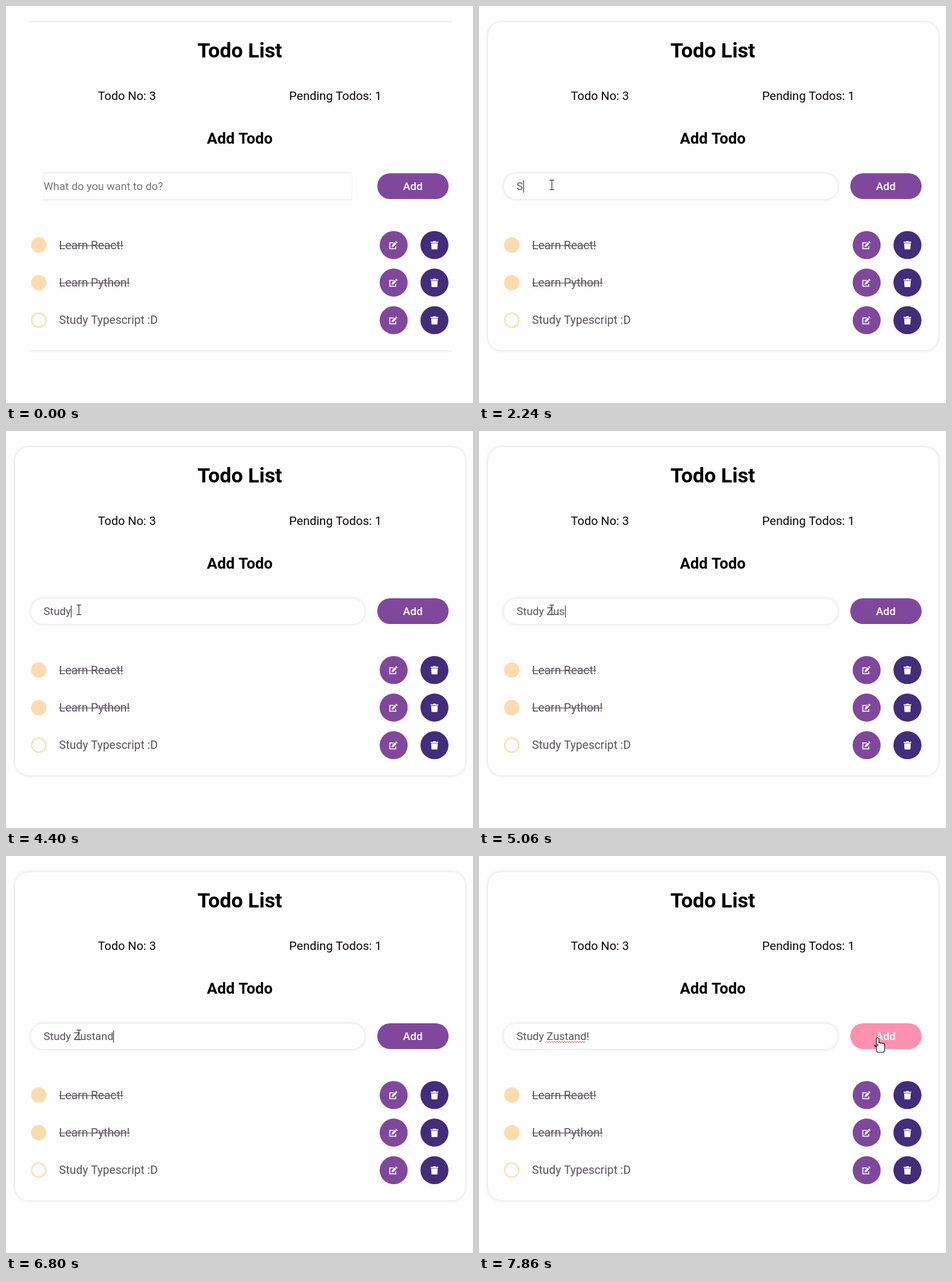
Write an HTML page with a canvas that moves like this. It is 727 px wide and 617 px high and loops after 8000 ms.

```html
<!DOCTYPE html>
<html lang="en">
<head>
<meta charset="utf-8">
<title>Todo List</title>
<style>
html, body { margin: 0; width: 727px; height: 617px; overflow: hidden; background: #fefefe; }
canvas { display: block; }
</style>
</head>
<body>
<canvas id="stage" width="727" height="617"></canvas>
<script>
const ctx = document.getElementById('stage').getContext('2d');
const LOOP = 8000, KEY_GAP = 100, BLINK = 560;
const ENTER = 130, CLICK = 990, LEAVE = 7000;
const PAPER = '#fefefe', PURPLE = '#80489c', INDIGO = '#432c7a', PINK = '#fd91af', PEACH = '#fcdcae';
const FIELD = { x: 38.5, y: 260.5, w: 520, h: 39.5 };
const BUTTON = { x: 578, y: 260, w: 111, h: 40 };
const TEXT_X = 58.5;

const todos = [['Learn React!', true], ['Learn Python!', true], ['Study Typescript :D', false]];

// Letters within a burst follow each other at an even pace.
const bursts = [[2120, 'S'], [2930, 'tud'], [3870, 'y'], [4460, ' '], [4790, 'Zustand'], [6860, '!']];
const keys = bursts.flatMap(([start, letters]) =>
  [...letters].map((letter, i) => ({ time: start + i * KEY_GAP, letter })));

const easeOut = k => 1 - (1 - k) ** 2;
const easeInOut = k => k * k * (3 - 2 * k);
const glides = [
  { start: ENTER, end: 500, from: [8, 590], to: [113, 278], ease: easeOut },
  { start: LEAVE, end: 7320, from: [113, 278], to: [717, 293], ease: easeInOut },
  { start: 7320, end: 7590, from: [717, 293], to: [620, 283], ease: easeInOut }
];

function pointerAt(t) {
  const glide = glides.filter(g => t >= g.start).pop();
  if (!glide) return null;
  const k = glide.ease(Math.min(1, (t - glide.start) / (glide.end - glide.start)));
  return glide.from.map((v, i) => v + (glide.to[i] - v) * k);
}

function inside(p, box) {
  return p && p[0] >= box.x && p[0] <= box.x + box.w && p[1] >= box.y && p[1] <= box.y + box.h;
}

function text(str, x, y, size, color, weight = 400, align = 'left') {
  ctx.font = `${weight} ${size}px Roboto, sans-serif`;
  ctx.fillStyle = color;
  ctx.textAlign = align;
  ctx.fillText(str, x, y);
}

function disc(x, y, r, color) {
  ctx.fillStyle = color;
  ctx.beginPath();
  ctx.arc(x, y, r, 0, Math.PI * 2);
  ctx.fill();
}

function pill({ x, y, w, h }, r, color) {
  ctx.fillStyle = color;
  ctx.beginPath();
  ctx.roundRect(x, y, w, h, r);
  ctx.fill();
}

// Before the pointer enters, only the level edges of a panel show.
function panel(box, r, t) {
  ctx.save();
  if (t < ENTER) {
    ctx.beginPath();
    ctx.rect(box.x + r, 0, box.w - 2 * r, 617);
    ctx.clip();
  }
  ctx.shadowColor = 'rgba(0,0,0,0.17)';
  ctx.shadowBlur = 5;
  pill(box, r, PAPER);
  ctx.restore();
}

function at(x, y, draw) {
  ctx.save();
  ctx.translate(x, y);
  draw();
  ctx.restore();
}

function editIcon() {
  ctx.strokeStyle = ctx.fillStyle = '#fff';
  ctx.lineWidth = 1.5;
  ctx.stroke(new Path2D('M0.5-4H-5.5V5.2H3.7V1.5'));
  ctx.rotate(Math.PI / 4);
  ctx.fillRect(-1.6, -5, 3.2, 6.5);
  ctx.fillRect(-1.6, -7.8, 3.2, 2);
  ctx.fill(new Path2D('M-1.6 1.5H1.6L0 4Z'));
}

function trashIcon() {
  ctx.fillStyle = '#fff';
  ctx.fillRect(-6, -5.5, 12, 1.7);
  ctx.fillRect(-2, -6.5, 4, 1.4);
  ctx.fill(new Path2D('M-5.2-3H5.2L4.5 6.5H-4.5Z'));
}

function ibeam() {
  ctx.strokeStyle = '#222';
  ctx.lineWidth = 1;
  ctx.stroke(new Path2D('M-3-7.5H4M0.5-7.5V7.5M-3 7.5H4'));
}

function arrow() {
  ctx.fillStyle = '#100510';
  ctx.fill(new Path2D('M0 0V14L3 11L5.5 17L8 16L5.5 10.5H9.5Z'));
}

function hand() {
  const outline = new Path2D('M-1 14L-4.5 11');
  for (let i = 0; i < 4; i++) outline.roundRect(-1 + i * 3, i ? 7 + i * 0.5 : 0, 3, 10, 1.5);
  outline.roundRect(-1, 11, 12, 10.5, 3);
  ctx.strokeStyle = '#181018';
  ctx.lineWidth = 2;
  ctx.stroke(outline);
  ctx.fillStyle = '#fff';
  ctx.fill(outline);
}

function todoRow([label, done], row) {
  const y = 371.5 + row * 58.4;
  const base = 378 + row * 58;
  disc(51, y, 12, PEACH);
  if (!done) disc(51, y, 10, PAPER);
  text(label, 82.5, base, 18, '#58505e');
  if (done) ctx.fillRect(82.5, base - 6, ctx.measureText(label).width, 1);
  disc(603.5, y, 21.8, PURPLE);
  disc(667, y, 21.8, INDIGO);
  at(603, y + 0.5, editIcon);
  at(667, y + 0.3, trashIcon);
}

function spellingMark() {
  const start = TEXT_X + ctx.measureText('Study ').width;
  const end = start + ctx.measureText('Zustand').width;
  ctx.strokeStyle = '#c8402f';
  ctx.lineWidth = 1;
  ctx.beginPath();
  for (let x = start, i = 0; x <= end; x += 2, i++) ctx.lineTo(x, 288 + (i % 2) * 2);
  ctx.stroke();
}

function inputField(t) {
  panel(FIELD, 20, t);
  const pressed = keys.filter(key => key.time <= t);
  const value = pressed.map(key => key.letter).join('');
  text(value || 'What do you want to do?', TEXT_X, 286, 17, value ? '#58505e' : '#757575');

  const lastAction = pressed.length ? pressed[pressed.length - 1].time : CLICK;
  if (t >= CLICK && Math.floor((t - lastAction) / BLINK) % 2 === 0) {
    ctx.fillStyle = '#333';
    ctx.fillRect(Math.round(TEXT_X + ctx.measureText(value).width), 271, 1, 19);
  }
  if (pressed.length === keys.length) spellingMark();
}

function render(t) {
  ctx.fillStyle = PAPER;
  ctx.fillRect(0, 0, 727, 617);
  panel({ x: 14, y: 25, w: 701, h: 510 }, 21, t);

  text('Todo List', 364, 80, 32, '#000', 700, 'center');
  text('Todo No: 3', 188.3, 146, 18.72, '#0c0408', 400, 'center');
  text('Pending Todos: 1', 512.8, 146, 18.72, '#0c0408', 400, 'center');
  text('Add Todo', 364, 214, 24, '#000', 700, 'center');

  const mouse = pointerAt(t);
  const hover = inside(mouse, BUTTON);
  inputField(t);
  pill(BUTTON, 20, hover ? PINK : PURPLE);
  text('Add', 633.3, 286, 17, '#fff', 500, 'center');
  todos.forEach(todoRow);

  if (mouse) at(...mouse, hover ? hand : inside(mouse, FIELD) ? ibeam : arrow);
}

function tick() {
  render(performance.now() % LOOP);
  requestAnimationFrame(tick);
}
tick();
</script>
</body>
</html>
```
